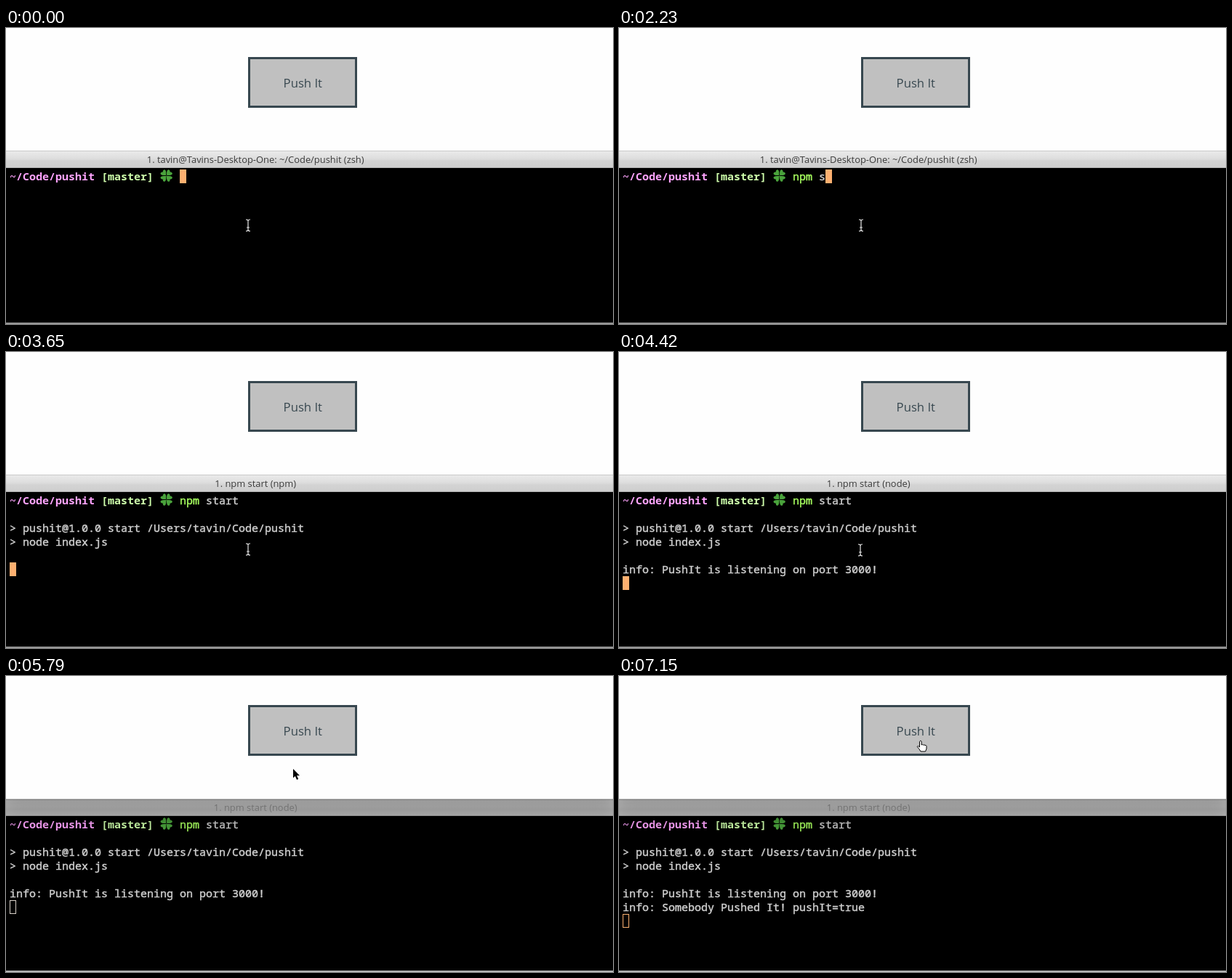
Write an HTML page that moves like this. It is 835 by 408 pixels and loops after 8000 ms.

```html
<!DOCTYPE html>
<html lang="en">
<head>
<meta charset="utf-8">
<title>Push It</title>
<style>
  html, body { margin: 0; width: 100%; height: 100%; overflow: hidden; background: #fefefe; }
  svg { display: block; width: 100%; height: 100%; }
  text { white-space: pre; }
  .ui { font-family: "Open Sans", "Noto Sans", sans-serif; font-weight: 500; text-anchor: middle; }
  .term { font: 500 15px "Noto Sans Mono", "DejaVu Sans Mono", monospace; fill: #cfcfcf; }
  #arg, #lines { stroke: #cfcfcf; stroke-width: .45; }
  #cmd { stroke-width: .45; }
  .path { font-weight: 700; fill: #ffa4fe; }
  .branch { font-weight: 700; fill: #ceffab; }
</style>
</head>
<body>
<svg viewBox="0 0 835 408">
  <defs>
    <linearGradient id="bar" x2="0" y2="1">
      <stop stop-color="#ebebeb"/>
      <stop offset=".45" stop-color="#dedede"/>
      <stop offset=".6" stop-color="#d3d3d3"/>
      <stop offset="1" stop-color="#cecece"/>
    </linearGradient>
    <filter id="blur" filterUnits="userSpaceOnUse" x="-150" y="-100" width="1135" height="450">
      <feGaussianBlur stdDeviation="18"/>
    </filter>
    <clipPath id="below"><rect y="170" width="835" height="238"/></clipPath>
  </defs>

  <rect width="835" height="408" fill="#fefefe"/>
  <rect x="334.5" y="41.5" width="147" height="67" fill="#c0c0c0" stroke="#37474f" stroke-width="3"/>
  <text class="ui" x="408.3" y="82" font-size="16.7" fill="#37474f">Push It</text>

  <rect y="169" width="835" height="24" fill="url(#bar)"/>
  <rect y="169" width="835" height="1" fill="#c9c9c9"/>
  <rect y="192" width="835" height="1" fill="#b2b2b2"/>
  <text class="ui" id="title" x="343.2" y="186" font-size="12.9"></text>

  <rect y="193" width="835" height="215"/>
  <rect id="foot" y="406" width="835" height="2"/>
  <g class="term">
    <text class="path" x="5" y="210">~/Code/pushit</text>
    <text class="branch" x="131" y="210">[master]</text>
    <text id="cmd" x="239" y="210"></text>
    <text id="arg" x="275" y="210"></text>
    <g id="lines"></g>
  </g>
  <g transform="translate(220.7 203.5)" fill="#4aa33c" id="clover">
    <path d="M0 0Q1 5 4 7.500" fill="none" stroke="#3b8a30" stroke-width="1.300"/>
  </g>
  <rect id="caret"/>

  <g id="shadow" clip-path="url(#below)">
    <rect x="-20" y="60" width="875" height="135" opacity=".36" filter="url(#blur)"/>
    <rect y="170" width="835" height="1" opacity=".2"/>
  </g>

  <g id="mouse">
    <g fill="none">
      <path d="M-3-8Q0-8 0-6Q0-8 3-8M0-6V6M-3 8Q0 8 0 6Q0 8 3 8M-2 3H2" stroke="#e8e8e8" stroke-width="1.200"/>
    </g>
    <path d="M0 0V12.500L2.800 10L5 15L7.200 14L5 9.200H9Z" stroke="#fff" stroke-width="2" paint-order="stroke"/>
    <path d="M-1.500 9V1.200Q-.2-.8 1.100 1.200V6Q2.400 4.600 3.600 6.200Q5 5.200 6 6.600Q7.600 6 8 7.600V11Q7.500 13 6.500 15H0Q-1.500 12 -4.700 8.500Q-4.200 6.500 -1.500 9Z" fill="#fff" stroke="#000"/>
  </g>
</svg>
<script>
const $ = id => document.getElementById(id);
const NS = "http://www.w3.org/2000/svg";
const set = (el, attrs) => { for (const k in attrs) el.setAttribute(k, attrs[k]); };
const add = (parent, tag, attrs) => {
  const el = document.createElementNS(NS, tag);
  set(el, attrs);
  return parent.appendChild(el);
};
const show = (el, on) => el.setAttribute("visibility", on ? "visible" : "hidden");

for (let a = 45; a < 360; a += 90)
  add($("clover"), "path", { d: "M0-.8C-3-3-5.500-6.500-3.500-8Q-1.500-9 0-7Q1.500-9 3.500-8C5.500-6.500 3-3 0-.8Z", transform: `rotate(${a})` });

const keys = [1320, 1410, 1580, 2000, 2230, 2350, 2530, 2700, 2820];
const command = "npm start";

// [time, row, text]
const output = [
  [3650, 2, "> pushit@1.0.0 start /Users/tavin/Code/pushit"],
  [3650, 3, "> node index.js"],
  [3880, 5, "info: PushIt is listening on port 3000!"],
  [7150, 6, "info: Somebody Pushed It! pushIt=true"]
].map(([time, row, text]) => {
  const el = add($("lines"), "text", { x: 5, y: 210 + 19 * row });
  el.textContent = text;
  return { time, el };
});

const titles = [
  [0, "1. tavin@Tavins-Desktop-One: ~/Code/pushit (zsh)"],
  [3410, "1. npm start (npm)"],
  [3880, "1. npm start (node)"]
];
const caretRows = [[0, 0], [3360, 1], [3650, 5], [3880, 6], [7150, 7]];
const latest = (list, t) => list.filter(e => t >= e[0]).pop()[1];

// Quadratic moves: first step, last step, step count, start, control, end
const moves = [
  [4420, 4770, 7, [333, 272], [296, 296], [251, 308.5]],
  [4950, 5370, 8, [251, 308.5], [305, 145], [395, 128]],
  [6030, 6380, 6, [395, 128], [400, 108], [415, 89]]
];
const ease = u => u < .5 ? 4 * u ** 3 : 1 - 4 * (1 - u) ** 3;

function mouseAt(t) {
  let pos = moves[0][3];
  for (const [from, to, n, a, b, c] of moves) {
    if (t < from) break;
    const step = Math.floor((t - from) / (to - from) * (n - 1) + 1e-6) + 1;
    const u = ease(Math.min(1, step / n)), v = 1 - u;
    pos = a.map((p, i) => Math.round(v * v * p + 2 * u * v * b[i] + u * u * c[i]));
  }
  return pos;
}

function draw(t) {
  const typed = keys.filter(k => t >= k).length;
  const blurred = t >= 5790;
  const color = typed === 2 ? "#ff6c60" : "#a8ff60";

  $("cmd").textContent = command.slice(0, Math.min(typed, 3));
  set($("cmd"), { fill: color, stroke: color });
  $("arg").textContent = command.slice(4, Math.max(typed, 4));
  for (const { time, el } of output) show(el, t >= time);

  $("title").textContent = latest(titles, t);
  set($("title"), { fill: blurred ? "#a0a0a0" : "#3c3c3c" });
  set($("foot"), { fill: blurred ? "#b4b4b4" : "#949494" });
  show($("shadow"), blurred);

  const row = latest(caretRows, t);
  const x = row ? 5 : 239 + 9 * typed, y = 195 + 19 * row;
  set($("caret"), blurred
    ? { x: x + .5, y: y + .5, width: 8, height: 18, fill: "none", stroke: t < 7150 ? "#d8d0c8" : "#fdb070" }
    : { x, y, width: 9, height: 19, fill: "#fdb070", stroke: "none" });

  const [mx, my] = mouseAt(t);
  const shape = my >= 193 ? 0 : my >= 110 ? 1 : 2;
  set($("mouse"), { transform: `translate(${mx} ${my})` });
  [...$("mouse").children].forEach((el, i) => show(el, i === shape));
}

function tick() {
  draw(performance.now() % 8000);
  requestAnimationFrame(tick);
}
tick();
</script>
</body>
</html>
```
